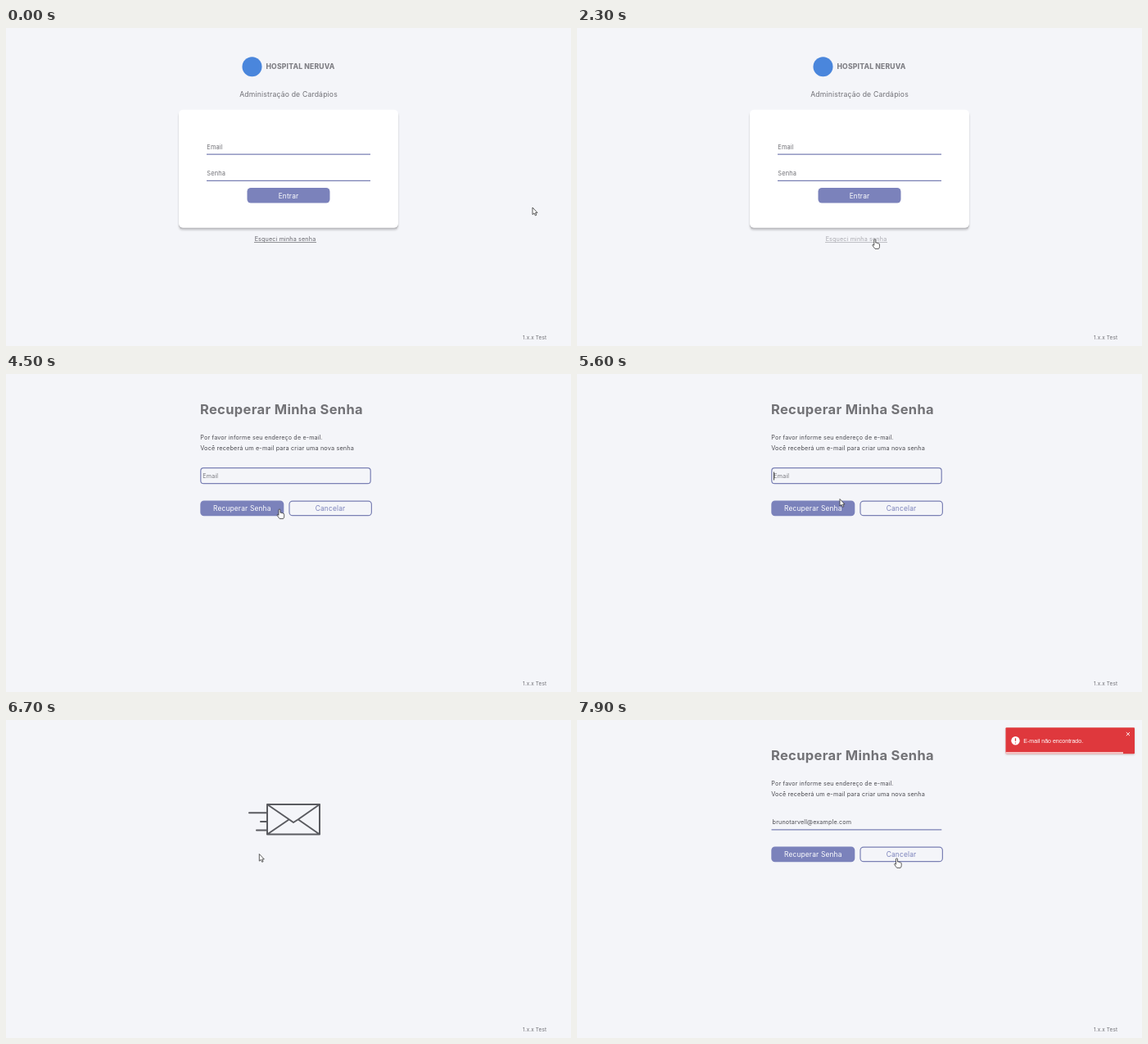
These frames come from a looping animation (690 px wide and 388 px high, 8 s). An HTML page:

```html
<!DOCTYPE html>
<html lang="pt">
<head>
<meta charset="utf-8">
<title>Recuperar senha</title>
<style>
  html, body { margin: 0; height: 100%; overflow: hidden; background: #f4f5f9; }
  svg { display: block; width: 100vw; height: 100vh; }
  text { font: 7.2px Inter, "Open Sans", sans-serif; letter-spacing: .02em; fill: #4c4c52; }
  .mid { text-anchor: middle; }
  .soft { fill: #707076; }
  .field { font-size: 7.4px; }
  .button { font-size: 8.4px; }
  .line { stroke: #7a80b4; stroke-width: 1.2; fill: none; }
  .fill { fill: #7b82bb; }
  #cursors path { stroke: #333; stroke-width: .8; stroke-linejoin: round; fill: #fff; }
  #loader { fill: none; stroke: #5a5b60; stroke-width: 2; stroke-linecap: round; stroke-linejoin: round; }
</style>
</head>
<body>
<svg viewBox="0 0 690 388">
  <defs>
    <filter id="shade" x="-10%" y="-20%" width="120%" height="150%">
      <feDropShadow dx="0" dy="1" stdDeviation="1" flood-opacity=".2"/>
    </filter>
  </defs>
  <rect width="690" height="388" fill="#f4f5f9"/>

  <g id="login">
    <circle cx="300.5" cy="47.3" r="12" fill="#4a86dc"/>
    <text x="317.5" y="50.4" style="font-size:8.6px;font-weight:800;fill:#808086">HOSPITAL NERUVA</text>
    <text class="mid soft" x="345.1" y="84" style="font-size:8.65px">Administração de Cardápios</text>
    <rect x="211" y="101.6" width="268" height="144" rx="5" fill="#bcbcc0" filter="url(#shade)"/>
    <rect x="211" y="99.8" width="268" height="144" rx="5" fill="#fff"/>
    <text class="soft field" x="245.3" y="147.5">Email</text>
    <text class="soft field" x="245.3" y="179.8">Senha</text>
    <path class="line" d="M245 154.2H445M245 186.4H445"/>
    <rect class="fill" x="294.5" y="195" width="101" height="18.6" rx="4.5"/>
    <text class="mid button" x="345" y="207.6" style="fill:#fff">Entrar</text>
    <g id="link">
      <text class="mid" x="341" y="260.3" style="fill:inherit">Esqueci minha senha</text>
      <rect x="303" y="261.3" width="76" height=".7"/>
    </g>
  </g>

  <g id="form">
    <text x="237" y="48.8" style="font-size:16.5px;font-weight:700;fill:#727276">Recuperar Minha Senha</text>
    <text x="237.3" y="80">Por favor informe seu endereço de e-mail.</text>
    <text x="237.3" y="93.1" style="font-size:7.3px">Você receberá um e-mail para criar uma nova senha</text>
    <rect id="hover" x="237.8" y="114.6" width="207.4" height="19" fill="none" stroke="#cdced8"/>
    <path id="under" class="line" d="M237.5 133.8H445.3"/>
    <rect id="focus" class="line" x="237.8" y="114.7" width="207.4" height="19" rx="3.5"/>
    <text id="entry" y="127.1"></text>
    <rect id="caret" x="240" y="119.5" width=".9" height="10" fill="#333"/>
    <rect class="fill" x="237.3" y="154.5" width="102" height="18.8" rx="4.5"/>
    <text class="mid button" x="288.3" y="167.1" style="fill:#fff">Recuperar Senha</text>
    <rect class="line" x="346" y="155.1" width="100.4" height="17.6" rx="4"/>
    <text class="mid button" x="396" y="167.1" style="fill:#7b82bb">Cancelar</text>
  </g>

  <g id="loader">
    <path id="envelope" pathLength="1" stroke-dasharray="1"
      d="M319 103H383V139.5H319V103L346 121.5L351 125L356.5 121.5L383 103M319 139.5L345.5 121.5M383 139.5L357 121.5"/>
    <path id="speed"/>
  </g>

  <g id="toast">
    <rect x="523.5" y="9.3" width="157.5" height="31.9" rx="1" fill="#df393d" filter="url(#shade)"/>
    <circle cx="535.5" cy="25.3" r="5.2" fill="#fff"/>
    <path d="M535.5 22.2V25.8M535.5 27.6V28.4" stroke="#df393d" stroke-width="1.3"/>
    <text x="545.3" y="27.8" style="font:7.05px 'Liberation Sans',Arial,sans-serif;letter-spacing:0;fill:#fff">E-mail não encontrado.</text>
    <path d="M670.8 15L675 19.2M675 15L670.8 19.2" stroke="#fff" stroke-width=".9"/>
    <rect id="bar" x="523.5" y="39" height="2.2" fill="#fff" opacity=".7"/>
  </g>

  <text x="631" y="380" class="soft" style="font-size:6.4px">1.x.x Test</text>

  <g id="cursors">
    <path id="arrow" d="M0 0V8.6L2 6.9L3.4 9.8L4.8 9.2L3.5 6.4H6Z"/>
    <path id="hand" d="M-1 7.4V1Q-1 0 0 0T1 1V4.3Q2 3.6 2.7 4.7Q3.8 4.1 4.3 5.2Q5.6 5 5.7 6.4V8.8Q5.6 10.5 4.6 11.6H.2Q-1.1 10.2-2.8 7.5Q-3 6.2-1.9 6.5Z"/>
    <path id="beam" d="M-2-4H-.6Q0-4 0-3.4Q0-4 .6-4H2M0-3.4V3.4M-2 4H-.6Q0 4 0 3.4Q0 4 .6 4H2" style="fill:none"/>
  </g>
</svg>

<script>
const LOOP = 8000, STEP = 100;
const $ = id => document.getElementById(id);
const show = (id, on) => { $(id).style.display = on ? "" : "none"; };
const clamp = v => Math.min(1, Math.max(0, v));

// Rows of time and values
const mouse = [
  [1200, 643, 219], [1500, 560, 150], [1800, 432, 185], [2100, 364, 257.5],
  [2200, 364, 257.5], [2300, 363.8, 257.8], [2800, 363.8, 257.8],
  [3200, 358, 185], [3600, 352, 134], [3700, 351, 128], [4000, 351, 128],
  [4500, 334, 165], [4600, 334, 165], [5000, 326, 167], [5500, 322, 158],
  [5600, 321, 152.5], [6000, 310, 162], [6100, 310, 162], [6200, 309.3, 163.5],
  [6700, 309.3, 163.5], [7000, 320, 179], [7100, 321, 181.3], [7300, 328, 183],
  [7700, 382, 174], [7900, 390.5, 168.8]
];
const bounce = [[7100, 13], [7200, -12], [7300, 5], [7400, -2], [7500, 0]];

function along(rows, t) {
  const i = rows.findIndex(r => r[0] > t);
  if (i < 0) return rows.at(-1).slice(1);
  if (i === 0) return rows[0].slice(1);
  const [a, b] = [rows[i - 1], rows[i]];
  const k = (t - a[0]) / (b[0] - a[0]);
  return a.slice(1).map((v, j) => v + (b[j + 1] - v) * k);
}

function draw(t) {
  const [x, y] = along(mouse, t);
  const within = (l, top, r, bottom) => x >= l && x <= r && y >= top && y <= bottom;
  const login = t < 2700, loading = t >= 6000 && t < 7000, form = !login && !loading;
  const filled = t >= 5700, focused = t >= 3800 && t < 5900;

  show("login", login);
  show("form", form);
  show("loader", loading && t >= 6200);
  show("toast", t >= 7100);

  const onLink = login && within(303, 252, 379, 264);
  const onField = form && within(237, 114, 446, 134.5);
  const onButton = form && (within(237, 154.5, 339, 173) || within(346, 154.5, 447, 173));
  $("link").setAttribute("fill", onLink ? "#aaaab0" : "#66666c");

  show("hover", onField && !focused);
  show("under", !focused);
  show("focus", focused);
  show("caret", focused && !filled && (t - 3800) % 1200 < 700);
  const entry = $("entry");
  entry.textContent = filled ? "brunotarvell@example.com" : "Email";
  entry.setAttribute("x", focused ? 240.3 : 238.6);
  entry.style.fill = filled ? "#4c4c52" : "#77777d";

  $("envelope").setAttribute("stroke-dashoffset", 1 - clamp((t - 6100) / 400));
  $("speed").setAttribute("d", [[113.3, 21], [124, 7], [134.5, 12]].map(([row, size], i) => {
    const length = size * clamp((t - 6300) / 200) * (1 + .35 * Math.sin((t - 6700) / 90) * (i - 1.5));
    return `M318 ${row}h${-length}`;
  }).join(""));

  $("toast").setAttribute("transform", `translate(${along(bounce, t)[0]})`);
  $("bar").setAttribute("width", 157.5 * clamp(1 - (t - 7100) / 9000));

  const kind = onLink || onButton ? "hand" : onField ? "beam" : "arrow";
  for (const id of ["arrow", "hand", "beam"]) show(id, id === kind);
  $("cursors").setAttribute("transform", `translate(${x} ${y})`);
}

const start = performance.now();
function tick() {
  const t = (performance.now() - start) % LOOP;
  draw(Math.floor(t / STEP) * STEP);
  requestAnimationFrame(tick);
}
tick();
</script>
</body>
</html>
```
